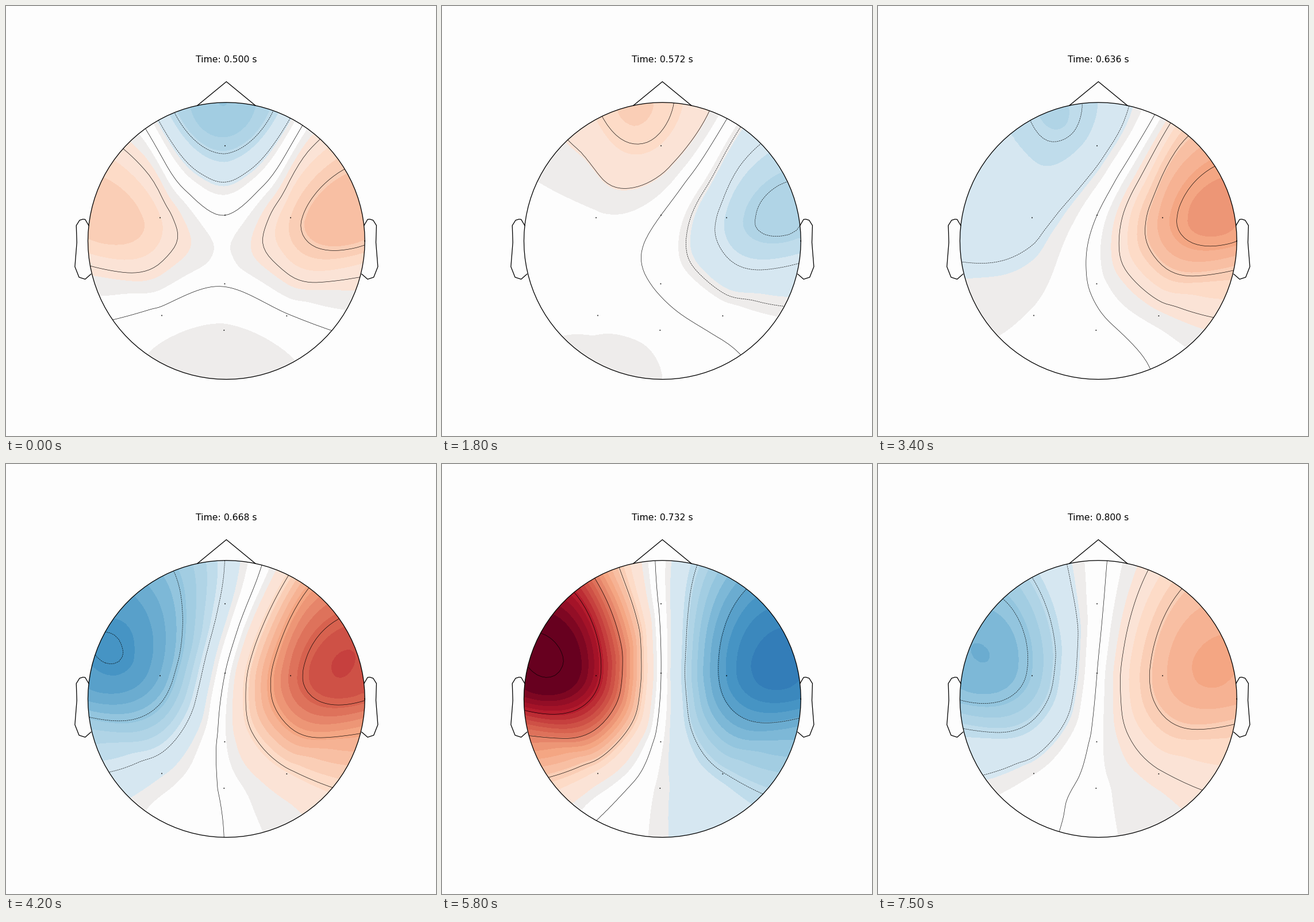
Animation of 748 by 748 pixels, one loop 7.6 s. Source, as a matplotlib script:

```python
import numpy as np
import matplotlib.pyplot as plt
from matplotlib.animation import FuncAnimation
from matplotlib.colors import BoundaryNorm, ListedColormap
from matplotlib.patches import Circle
from matplotlib.tri import CubicTriInterpolator, Triangulation

SIZE, DPI = 748, 93.5
FRAMES, INTERVAL = 76, 100
CX, CY, R = 383.35, 408.6, 240.86   # head circle in pixels
VMAX = 15.4
PAPER, GREY = "#fdfdfd", "#eeeceb"

# Sensors relative to the head centre, y up
SENSORS = np.array([
    (-2.3, 165.4),                                   # Fz
    (-115.3, 40.3), (-2.3, 44.8), (111.7, 40.3),     # C3 Cz C4
    (-2.9, -74.7),                                   # Pz
    (-112.3, -129.8), (-4, -155.5), (105, -130.5),   # PO7 Oz PO8
])


def natural_spline(t, y, ts):
    """Natural cubic spline through the points (t, y)."""
    h = np.diff(t).astype(float)
    n = len(t)
    a, b = np.eye(n), np.zeros(n)
    for i in range(1, n - 1):
        a[i, i - 1:i + 2] = h[i - 1], 2 * (h[i - 1] + h[i]), h[i]
        b[i] = 6 * ((y[i + 1] - y[i]) / h[i] - (y[i] - y[i - 1]) / h[i - 1])
    m = np.linalg.solve(a, b)
    k = np.clip(np.searchsorted(t, ts, side="right") - 1, 0, n - 2)
    p, q = t[k + 1] - ts, ts - t[k]
    return ((m[k] * p**3 + m[k + 1] * q**3) / (6 * h[k])
            + (y[k] / h[k] - m[k] * h[k] / 6) * p
            + (y[k + 1] / h[k] - m[k + 1] * h[k] / 6) * q)


def potentials():
    """Three source waves; the rear sensors are mixtures of them."""
    t = np.array([0, 11, 25, 34, 50, 58, 75])
    ts = np.arange(FRAMES)
    front = natural_spline(t, [-4.5, 1, 1.5, -2.8, -.36, -.4, -.45], ts) \
        if False else spline_wave(t, ts, -4.5, 1, 1.5, -2.8, -.36, -.4, -.45)
    left = spline_wave(t, ts, 2.7, -4.8, 5, -2.5, -1.3, 12.7, -5.65)
    right = spline_wave(t, ts, 3.4, 2.2, -5.25, 5.2, 1.41, -8.7, 4.7)
    pz = .05 * right - .03 * left
    po7 = .15 * left - .07 * right + .12 * front
    oz = .22 * front - .1 * left
    po8 = .24 * right - .14 * left + .12 * front
    return np.column_stack([front, left, 0 * ts, right, pz, po7, oz, po8])


def spline_wave(t, ts, *values):
    return natural_spline(t, np.array(values), ts)


def smooth_gradients(pts, edges, z):
    """Vertex gradients with the least curvature along all edges."""
    n = len(pts)
    a, b = np.zeros((2 * n, 2 * n)), np.zeros(2 * n)
    for i, j in np.vstack([edges, edges[:, ::-1]]):
        e = pts[j] - pts[i]
        cube = np.hypot(*e) ** 3
        ee = np.outer(e, e) / cube
        si, sj = slice(2 * i, 2 * i + 2), slice(2 * j, 2 * j + 2)
        a[si, si] += 4 * ee
        a[si, sj] += 2 * ee
        b[si] += 6 * (z[j] - z[i]) * e / cube
    return np.linalg.solve(a, b).reshape(n, 2).T


def interpolation_basis(xi, yi):
    """One smooth map per sensor; any field is a weighted sum of them."""
    n = len(SENSORS)
    inner = Triangulation(*SENSORS.T)
    sides = [np.hypot(*(SENSORS[t] - SENSORS[np.roll(t, 1)]).T)
             for t in inner.triangles]
    ring = 1.1 * R + np.median(sides)
    angles = np.arange(12) * np.pi / 6
    pts = np.vstack([SENSORS, ring * np.c_[np.cos(angles), np.sin(angles)]])
    tri = Triangulation(*pts.T)

    # Ring points take the mean of the sensors next to them
    weights = np.zeros((len(pts), n))
    weights[:n] = np.eye(n)
    for i, j in np.vstack([tri.edges, tri.edges[:, ::-1]]):
        if i >= n > j:
            weights[i, j] = 1
    total = weights.sum(axis=1)
    used = total > 0
    weights[used] /= total[used, None]
    weights[~used] = weights[n:][used[n:]].mean(axis=0)

    maps = []
    for z in weights.T:
        dz = smooth_gradients(pts, tri.edges, z)
        f = CubicTriInterpolator(tri, z, kind="user", dz=(dz[0], dz[1]))
        maps.append(np.ma.filled(f(xi, yi), 0.0))
    return np.array(maps)


def band_edges(white, grey, pale, step=0.75):
    """Ends of the white, grey and pale bands, then even steps."""
    return np.r_[white, grey, np.arange(pale, VMAX, step)]


def banded_colors():
    low, high = band_edges(1.15, 1.75, 3.5), band_edges(0.75, 1.45, 2.7)
    edges = np.r_[-40, -low[::-1], high, 40]
    mids = np.clip((edges[:-1] + edges[1:]) / 2, -VMAX, VMAX)
    colors = list(plt.get_cmap("RdBu_r")(0.5 + mids / (2 * VMAX)))
    mid = len(low)
    colors[mid] = PAPER
    colors[mid - 1] = colors[mid + 1] = GREY
    return ListedColormap(colors), BoundaryNorm(edges, len(colors))


def draw_head(ax):
    ring = np.linspace(0, 2 * np.pi, 101)
    dx = np.deg2rad(12)
    dy = np.sqrt(1 - dx**2)
    ear = 2 * np.array([(.497, .0555), (.51, .0775), (.518, .0783),
                        (.53, .0746), (.542, .0555), (.54, -.0055),
                        (.547, -.0932), (.532, -.1313), (.51, -.1384),
                        (.489, -.1199)])
    outlines = [np.c_[np.cos(ring), np.sin(ring)],
                np.array([(-dx, dy), (0, 1.15), (dx, dy)]),
                ear, ear * (-1, 1)]
    for pts in outlines:
        ax.plot(*(pts * R).T, color="k", lw=1, zorder=3)
    ax.scatter(*SENSORS.T, s=0.25, marker="o", edgecolor="k",
               facecolor="none", zorder=4)


axis = np.linspace(-R, R, 64)
XI, YI = np.meshgrid(axis, axis)
BASIS = interpolation_basis(XI, YI)
VALUES = potentials()

fig = plt.figure(figsize=(SIZE / DPI, SIZE / DPI), dpi=DPI, facecolor=PAPER)
ax = fig.add_axes([0, 0, 1, 1])
cmap, norm = banded_colors()
image = ax.imshow(np.zeros_like(XI), cmap=cmap, norm=norm, origin="lower",
                  extent=(-R, R, -R, R), interpolation="bilinear", zorder=1)
disc = Circle((0, 0), R, transform=ax.transData)
image.set_clip_path(disc)
draw_head(ax)
title = ax.text(0, CY - 97.8, "", ha="center", va="baseline",
                fontsize=12, family="DejaVu Sans")
ax.set_xlim(-CX, SIZE - CX)
ax.set_ylim(CY - SIZE, CY)
ax.set_autoscale_on(False)
ax.axis("off")
lines = []


def update(i):
    field = np.tensordot(VALUES[i], BASIS, axes=1)
    image.set_data(field)
    while lines:
        lines.pop().remove()
    contours = ax.contour(XI, YI, field, 6, colors="k", linewidths=0.5,
                          zorder=2)
    contours.set_clip_path(disc)
    lines.append(contours)
    title.set_text(f"Time: {0.5 + 0.004 * i:.3f} s")
    return image, title


anim = FuncAnimation(fig, update, frames=FRAMES, interval=INTERVAL,
                     repeat=True, repeat_delay=0, blit=False)
plt.show()
```
